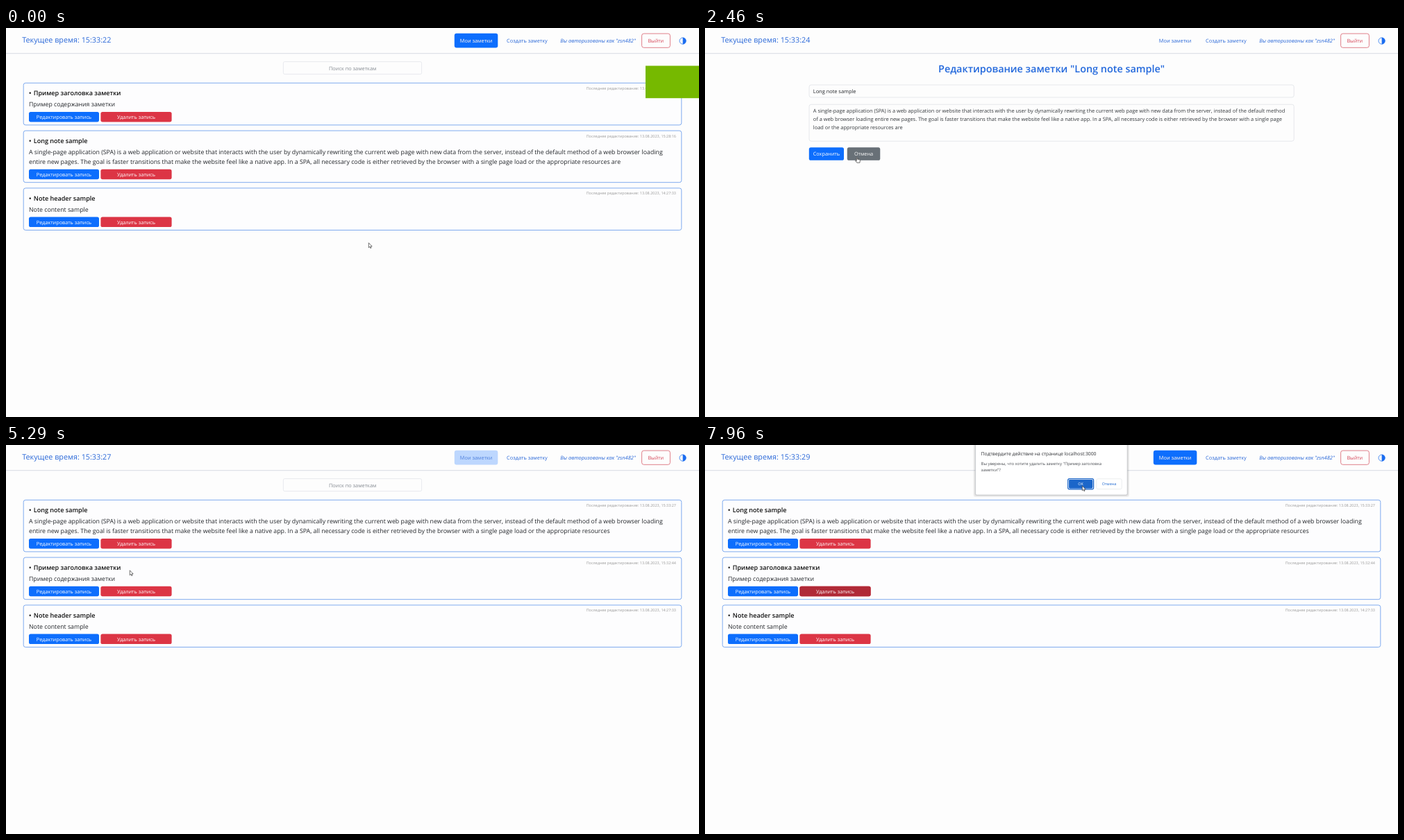
An HTML page for the animation above (8 s loop, 998 by 561 pixels).

```html
<!DOCTYPE html>
<html lang="ru">
<head>
<meta charset="utf-8">
<title>Заметки</title>
<style>
html, body { margin: 0; width: 100%; height: 100%; overflow: hidden; background: #fdfdfd; }
svg { display: block; width: 100vw; height: 100vh; }
text { font-family: "Open Sans", "Noto Sans", sans-serif; text-rendering: geometricPrecision; white-space: pre; }
</style>
</head>
<body>
<svg id="stage" viewBox="0 0 998 561" xmlns="http://www.w3.org/2000/svg"></svg>
<script>
const NS = 'http://www.w3.org/2000/svg';
const LOOP = 8000;
const BLUE = '#0d6efd', LINK = '#2a68d8', RED = '#dc3545', INK = '#23262a';
const stage = document.getElementById('stage');

// When things happen, in ms
const TICKS = [940, 1910, 2960, 3930, 4900, 5910, 6880];
const KEYS = [3560, 3700, 3840, 3980];
const OPEN_EDIT = 1900, HIDE_URL = 2220, FOCUS = 2950, SAVE = 5240, PRESS = 6700, DIALOG = 6960;

// Pointer track: time, x, y
const TRACK = [
  [0, 522, 309.5], [460, 522, 309.5], [700, 455, 296], [950, 290, 250], [1200, 150, 214],
  [1400, 90, 209], [1800, 90, 208], [1920, 99.3, 208], [2130, 105, 208], [2300, 150, 204],
  [2650, 300, 165], [2900, 350.5, 155], [3290, 350.5, 155], [3600, 340, 154], [4080, 300, 154],
  [4300, 285, 156], [4500, 269.5, 156], [4750, 190, 173], [4900, 172, 181], [5220, 173, 181],
  [5290, 178, 180.5], [5630, 180, 180.5], [5790, 180, 180.5], [6100, 322, 190], [6460, 200, 184.5],
  [6580, 190, 204], [6700, 188, 209], [7060, 188, 209], [7460, 318, 149], [7700, 455, 90],
  [7920, 543, 58.5], [8000, 543, 58.5]
];

function el(parent, tag, attrs, content) {
  const node = document.createElementNS(NS, tag);
  for (const k in attrs) node.setAttribute(k, attrs[k]);
  if (content !== undefined) node.textContent = content;
  parent.appendChild(node);
  return node;
}
const group = parent => el(parent, 'g', {});
const box = (parent, x, y, w, h, fill, rx = 0, more = {}) =>
  el(parent, 'rect', { x, y, width: w, height: h, fill, rx, ...more });
const label = (parent, x, y, size, fill, content, more = {}) =>
  el(parent, 'text', { x, y, 'font-size': size, fill, ...more }, content);
const MID = { 'text-anchor': 'middle' }, END = { 'text-anchor': 'end' };

const clamp = v => Math.max(0, Math.min(1, v));
const smooth = v => { v = clamp(v); return v * v * (3 - 2 * v); };
const ramp = (t, start, len = 150) => smooth((t - start) / len);
const show = (node, on) => node.setAttribute('visibility', on ? 'inherit' : 'hidden');
const fade = (node, v) => node.setAttribute('opacity', v);

const buttons = [];
function button(parent, from, to, x, y, w, h, color, hot, size, content) {
  box(parent, x, y, w, h, color, 2.6);
  const over = box(parent, x, y, w, h, hot, 2.6, { opacity: 0 });
  label(parent, x + w / 2, y + h / 2 + size * 0.38, size, '#fff', content, MID);
  const b = { from, to, x, y, w, h, over };
  buttons.push(b);
  return b;
}

// Top bar
box(stage, 0, 0, 998, 561, '#fdfdfd');
box(stage, 0, 36, 998, 1, '#dfe2e8');
box(stage, 0, 37, 998, 1, '#f4f5f8');
const clock = label(stage, 23.3, 21, 10.8, LINK, '');
const mineFill = box(stage, 645.8, 7.8, 62.5, 20.6, BLUE, 3);
label(stage, 677.2, 20.7, 7.35, LINK, 'Мои заметки', MID);
const mineText = label(stage, 677.2, 20.7, 7.35, '#fff', 'Мои заметки', MID);
label(stage, 750.4, 20.7, 7.35, LINK, 'Создать заметку', MID);
label(stage, 852.5, 20.5, 7.45, LINK, 'Вы авторизованы как "zsn482"', { ...MID, 'font-style': 'italic' });
box(stage, 915.6, 8.1, 40.8, 20.2, 'none', 3, { stroke: '#d9606c', 'stroke-width': 0.8 });
label(stage, 935.8, 20.9, 7.2, '#d6485a', 'Выйти', MID);
el(stage, 'circle', { cx: 974.6, cy: 18.6, r: 4.6, fill: '#fdfdfd', stroke: '#2473ee', 'stroke-width': 0.8 });
el(stage, 'path', { d: 'M974.6 13.8a4.8 4.8 0 0 1 0 9.6z', fill: '#1a6cf0' });

// Notes list
const LINE = 'A single-page application (SPA) is a web application or website that interacts with the user by dynamically rewriting the current web page with new data from the server, instead of the default method of a web browser loading';
const TAIL = 'entire new pages. The goal is faster transitions that make the website feel like a native app. In a SPA, all necessary code is either retrieved by the browser with a single page load or the appropriate resources';
const sampleRu = { title: 'Пример заголовка заметки', lines: ['Пример содержания заметки'], time: '15:32:44' };
const sampleEn = { title: 'Note header sample', lines: ['Note content sample'], time: '14:27:33' };
const longNote = (end, time) => ({ title: 'Long note sample', lines: [LINE, TAIL + end], time });

function card(parent, from, to, y, note) {
  const extra = (note.lines.length - 1) * 14;
  box(parent, 25.2, y, 947.6, 60.6 + extra, '#fdfdfe', 3, { stroke: '#7fabef', 'stroke-width': 1 });
  label(parent, 33, y + 17.6, 9.05, '#111', '•', { 'font-weight': 600 });
  label(parent, 39.8, y + 17.6, 9.05, '#111', note.title, { 'font-weight': 600 });
  label(parent, 965, y + 9.4, 5.46, '#999', 'Последнее редактирование: 13.08.2023, ' + note.time, END);
  note.lines.forEach((s, i) => label(parent, 33, y + 33.9 + i * 14, /^П/.test(s) ? 8.7 : 8.79, INK, s));
  const top = y + 41.7 + extra;
  button(parent, from, to, 33, top, 101, 14.4, BLUE, '#0b5ed7', 7.25, 'Редактировать запись');
  const del = button(parent, from, to, 136.4, top, 102.2, 14.4, RED, '#b02a37', 7.25, 'Удалить запись');
  return { del, next: y + 68.8 + extra };
}
function list(from, to, notes) {
  const g = group(stage);
  box(g, 399.4, 48.6, 199.2, 18, '#fdfdfd', 2, { stroke: '#e2e5ea', 'stroke-width': 0.8 });
  label(g, 499.2, 60.8, 7.35, '#858b92', 'Поиск по заметкам', MID);
  let y = 79.3;
  const dels = notes.map(n => {
    const c = card(g, from, to, y, n);
    y = c.next;
    return c.del;
  });
  return { g, dels };
}
const before = list(0, OPEN_EDIT, [sampleRu, longNote(' are', '15:28:16'), sampleEn]);
const after = list(SAVE, LOOP, [longNote('', '15:33:27'), sampleRu, sampleEn]);

// Edit form
const form = group(stage);
label(form, 499, 63.8, 14.4, '#2268dc', 'Редактирование заметки "Long note sample"', { ...MID, 'font-weight': 600 });
box(form, 150, 82, 698.2, 18, '#fdfdfd', 3, { stroke: '#e0e3e8', 'stroke-width': 0.8 });
label(form, 155.8, 93.9, 7.42, INK, 'Long note sample');
box(form, 150, 110.2, 698.2, 53, '#fdfdfd', 3, { stroke: '#e0e3e8', 'stroke-width': 0.8 });
const ring = group(form);
box(ring, 149, 109.2, 700.2, 55, 'none', 3.5, { stroke: '#c2dafe', 'stroke-width': 2.4 });
box(ring, 150, 110.2, 698.2, 53, 'none', 3, { stroke: '#86b7fe', 'stroke-width': 0.8 });
const words = (LINE + ' ' + TAIL + ' are').split(' ');
const cut1 = words.indexOf('method') + 1;
const cut2 = words.lastIndexOf('load');
label(form, 155.8, 122.1, 7.4, '#33373b', words.slice(0, cut1).join(' '));
label(form, 155.8, 133.8, 7.4, '#33373b', words.slice(cut1, cut2).join(' '));
const lastLine = words.slice(cut2).join(' ');
const typed = label(form, 155.8, 145.5, 7.4, '#33373b', lastLine);
const caret = box(form, 0, 138, 0.7, 9, '#222');
button(form, OPEN_EDIT, SAVE, 149.8, 172.2, 50.2, 18.6, BLUE, '#0b5ed7', 7.35, 'Сохранить');
button(form, OPEN_EDIT, SAVE, 204.8, 172.2, 47.4, 18.6, '#6c757d', '#5c636a', 7.3, 'Отмена');

// Link address in the corner
const address = group(stage);
box(address, 0, 550.6, 61.4, 10.4, '#0078d4');
label(address, 2, 557.7, 5.6, '#fff', 'localhost:3000/edit/8');

// Confirm dialog
const dialog = group(stage);
[3, 2, 1].forEach(d => box(dialog, 389.5 - d, -6, 218.6 + 2 * d, 78 + d, '#000', 3, { 'fill-opacity': 0.05 }));
box(dialog, 389.5, -6, 218.6, 78, '#fff', 2, { stroke: '#b9bcc2', 'stroke-width': 0.6 });
label(dialog, 397.6, 15, 6.82, '#2b2d31', 'Подтвердите действие на странице localhost:3000');
label(dialog, 397.6, 28.8, 5.9, '#4a4d52', 'Вы уверены, что хотите удалить заметку "Пример заголовка');
label(dialog, 397.6, 38.2, 5.9, '#4a4d52', 'заметки"?');
box(dialog, 522.6, 48.6, 37, 15.2, '#fff', 2.4, { stroke: '#1c66c8', 'stroke-width': 1.2 });
box(dialog, 524, 50, 34.2, 12.4, '#1a73e8', 1.6);
const okHot = box(dialog, 524, 50, 34.2, 12.4, '#1b66c9', 1.6);
label(dialog, 541.1, 58.2, 5.5, '#fff', 'ОК', MID);
box(dialog, 563.8, 48.8, 36.4, 14.8, '#fff', 2, { stroke: '#e3e5e8', 'stroke-width': 0.7 });
label(dialog, 582, 58.2, 5.5, '#1a66d0', 'Отмена', MID);

const toast = box(stage, 921, 54.5, 78, 46.7, '#76b900');

// Pointer shapes
const pointer = group(stage);
const line = { stroke: '#333', 'stroke-width': 0.7, 'stroke-linejoin': 'round' };
const shapes = {
  arrow: el(pointer, 'path', { d: 'M.3.3v7l1.6-1.5 1 2.3 1.1-.5-1-2.2h2.2z', fill: '#fff', ...line }),
  hand: el(pointer, 'path', { d: 'M-.7 4.8v-4q.7-1 1.4 0v2.4l3 .6q.8.3.7 1.2l-.5 3.2h-4.200l-2.200-3q.3-1 1.800.4z', fill: '#fff', ...line }),
  beam: el(pointer, 'path', { d: 'M-1.700-3h3.400M0-3v6M-1.700 3h3.400', fill: 'none', stroke: '#333', 'stroke-width': 0.8 })
};

function at(t) {
  let i = 1;
  while (i < TRACK.length - 1 && TRACK[i][0] < t) i++;
  const [t0, x0, y0] = TRACK[i - 1], [t1, x1, y1] = TRACK[i];
  const u = clamp((t - t0) / (t1 - t0));
  return [x0 + (x1 - x0) * u, y0 + (y1 - y0) * u];
}
function hits(b, t) {
  if (t < b.from || t >= b.to || t >= DIALOG) return false;
  const [x, y] = at(t);
  return x >= b.x && x <= b.x + b.w && y >= b.y && y <= b.y + b.h;
}
// Share of the last 150 ms spent over the button
function heat(b, t) {
  let n = 0;
  for (let k = 0; k < 10; k++) n += hits(b, t - k * 15);
  return n / 10;
}

function render(t) {
  const editing = t >= OPEN_EDIT && t < SAVE;
  clock.textContent = 'Текущее время: 15:33:' + (22 + TICKS.filter(k => t >= k).length);
  const active = t < 3500 ? 1 - ramp(t, OPEN_EDIT) : ramp(t, SAVE);
  fade(mineFill, active);
  fade(mineText, active);

  show(before.g, t < OPEN_EDIT);
  show(form, editing);
  show(after.g, t >= SAVE);
  buttons.forEach(b => fade(b.over, heat(b, t)));
  if (t >= PRESS) fade(after.dels[1].over, 1);

  const gone = KEYS.filter(k => t >= k).length;
  typed.textContent = lastLine.slice(0, lastLine.length - gone);
  fade(ring, ramp(t, FOCUS, 140));
  const since = t - (gone ? KEYS[gone - 1] : FOCUS);
  show(caret, editing && since >= 0 && since % 1000 < 500);
  if (editing) caret.setAttribute('x', 156 + typed.getComputedTextLength());

  show(address, t >= 1340 && t < HIDE_URL);
  show(dialog, t >= DIALOG);
  fade(dialog, ramp(t, DIALOG, 90));
  fade(okHot, ramp(t, 7840, 120));
  show(toast, t < 170);
  toast.setAttribute('x', 921 + 77 * clamp((t - 35) / 135));

  const [x, y] = at(t);
  const inText = editing && x > 150 && x < 848 && y > 110 && y < 163;
  const kind = buttons.some(b => hits(b, t)) ? 'hand' : inText ? 'beam' : 'arrow';
  for (const k in shapes) show(shapes[k], k === kind);
  pointer.setAttribute('transform', `translate(${x} ${y})`);
}

const start = performance.now();
function frame(now) {
  render(Math.max(0, now - start) % LOOP);
  requestAnimationFrame(frame);
}
render(0);
requestAnimationFrame(frame);
</script>
</body>
</html>
```
